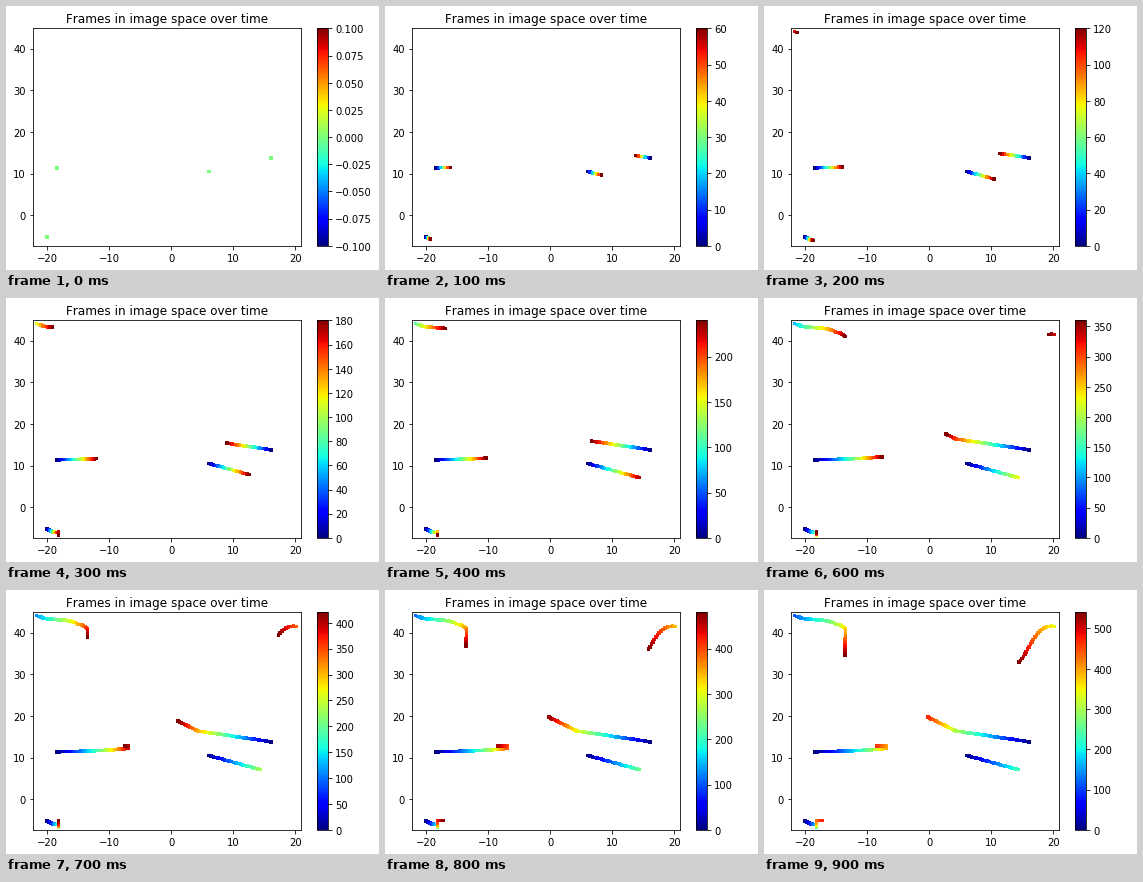
Write a matplotlib script that moves like this. It is 373x264 px and loops after 1000 ms.

```python
import numpy as np
import matplotlib.pyplot as plt
from matplotlib.animation import FuncAnimation
from matplotlib.transforms import ScaledTranslation

W, H, DPI = 373, 264, 72
FRAMES, INTERVAL = 10, 100
STEP, SPAN = 10, 60  # sample spacing, and time added per frame
LABEL_DROP, LABEL_PAD = 0.8, 7  # text sits slightly below its tick

plt.rcParams.update({"font.family": "DejaVu Sans", "font.size": 10,
                     "text.kerning_factor": 6})


def curve(start, end, *controls):
    """Rows of (time, x, y) along a Bezier curve of any degree."""
    times = np.arange(start, end + 1, STEP)
    u = ((times - start) / (end - start))[:, None]
    level = [np.array(c, float) for c in controls]
    while len(level) > 1:
        level = [a + (b - a) * u for a, b in zip(level, level[1:])]
    return np.column_stack([times, level[0]])


low = (-18.2, -6.6)
points = np.vstack([
    # middle left, doubling back at the end
    curve(0, 390, (-18.4, 11.4), (-10.5, 11.6), (-7, 12.2)),
    curve(400, 460, (-7, 12.8), (-8.4, 12.8)),
    # bottom left: down, rest, up and out
    curve(0, 170, (-20, -5.2), (-19, -6.2), (-18.2, -6)),
    curve(180, 420, low, low, low, (-18.2, -5.1)),
    curve(430, 470, (-18, -5.1), (-17.3, -5.1)),
    # the pair on the right
    curve(0, 300, (16.1, 13.8), (4.3, 16.4)),
    curve(310, 470, (4, 16.6), (-0.2, 19.7)),
    curve(0, 230, (6.1, 10.5), (14.4, 7.1)),
    # top left, turning downwards
    curve(110, 290, (-21.7, 44.1), (-19.6, 42.6), (-17.2, 43.6), (-15.2, 42.2)),
    curve(300, 380, (-15.1, 42.1), (-13.5, 41.6), (-13.5, 40.5)),
    curve(390, 540, (-13.5, 40.1), (-13.6, 34.5)),
    # top right
    curve(340, 540, (20.2, 41.5), (17, 42), (16.2, 35.5), (14.5, 32.9)),
])
points = points[np.argsort(points[:, 0], kind="stable")]

fig = plt.figure(figsize=(W / DPI, H / DPI), dpi=DPI, facecolor="white")
drop = ScaledTranslation(0, -LABEL_DROP / DPI, fig.dpi_scale_trans)


def add_axes(left, width):
    return fig.add_axes([left / W, 24.18 / H, width / W, 217.44 / H])


def lower_labels(labels, base):
    for label in labels:
        label.set_transform(base + drop)


ax = add_axes(26.9, 267.84)
ax.set(xlim=(-22.3, 20.9), ylim=(-7.33, 44.855), xticks=range(-20, 21, 10),
       yticks=range(0, 41, 10))
ax.tick_params(axis="x", pad=3.5 + LABEL_DROP)
ax.set_title("Frames in image space over time", fontsize=12, pad=6 - LABEL_DROP)
lower_labels(ax.get_yticklabels(), ax.get_yaxis_text1_transform(LABEL_PAD)[0])

dots = ax.scatter(points[:1, 1], points[:1, 2], c=points[:1, 0], s=13,
                  marker="s", linewidths=0, cmap="jet", vmin=-0.1, vmax=0.1)
cax = add_axes(311.48, 10.87)
fig.colorbar(dots, cax=cax)


def update(frame):
    now = frame * SPAN
    seen = points[points[:, 0] <= now]
    dots.set_offsets(seen[:, 1:])
    dots.set_array(seen[:, 0])
    dots.set_clim(*((0, now) if now else (-0.1, 0.1)))
    lower_labels(cax.get_yticklabels(), cax.get_yaxis_text2_transform(LABEL_PAD)[0])
    return [dots]


anim = FuncAnimation(fig, update, frames=FRAMES, interval=INTERVAL,
                     init_func=lambda: update(0), repeat=True, repeat_delay=0)
plt.show()
```
